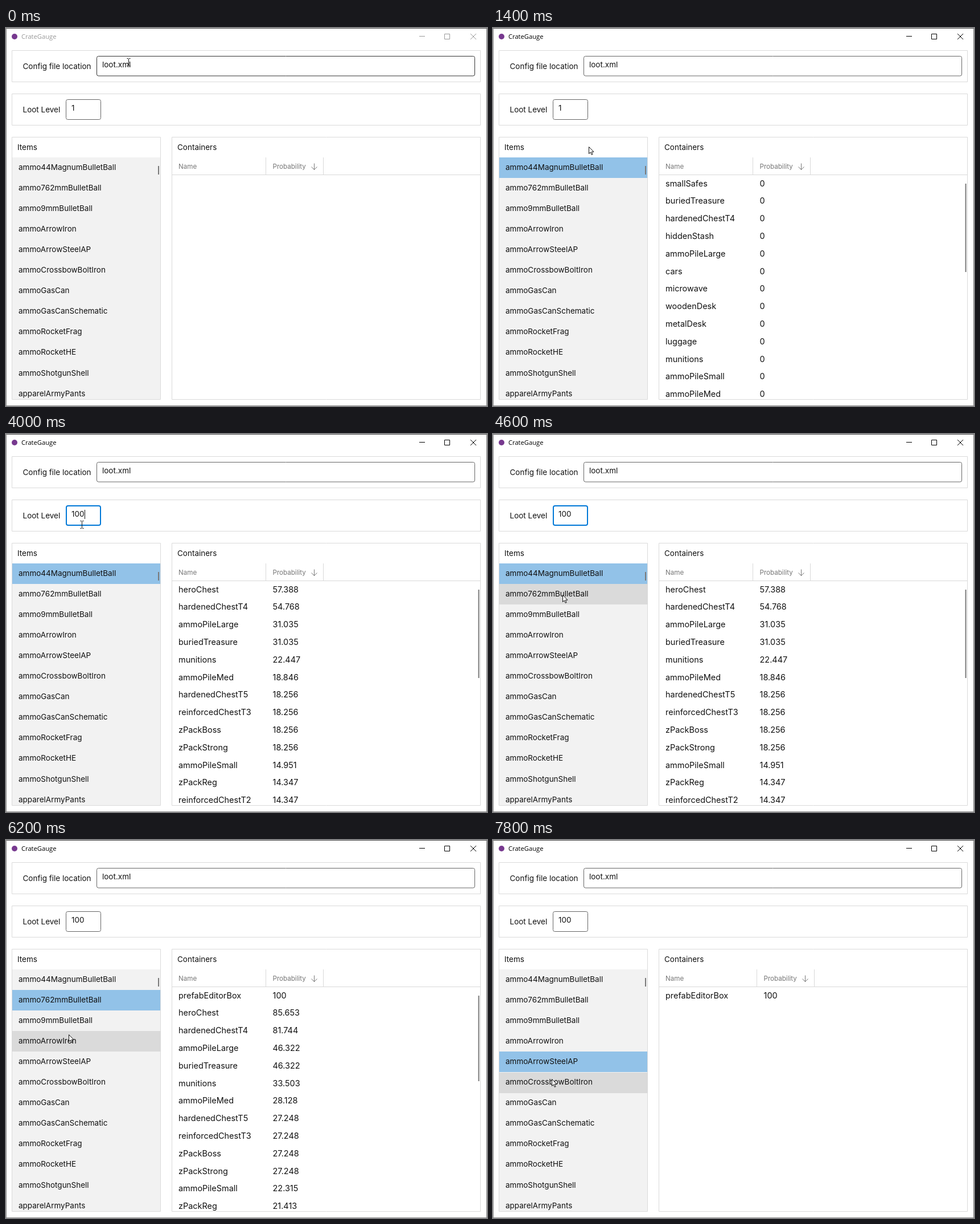
These frames come from a looping animation (845 by 663 pixels, 8 s). An HTML page with a canvas:

```html
<!DOCTYPE html>
<html lang="en">
<head>
<meta charset="utf-8">
<title>CrateGauge</title>
<style>
  html, body { margin: 0; width: 100%; height: 100%; overflow: hidden; background: #fff; }
  canvas { display: block; }
</style>
</head>
<body>
<canvas id="stage" width="845" height="663"></canvas>
<script>
const ctx = document.getElementById('stage').getContext('2d');
const LOOP = 8000;
const FOCUS = 2870, BLUR = 5200;
const UI_FONT = 'Inter, sans-serif';
const ROW = { top: 227, height: 36.1 };

const items = ('ammo44MagnumBulletBall ammo762mmBulletBall ammo9mmBulletBall ammoArrowIron ' +
  'ammoArrowSteelAP ammoCrossbowBoltIron ammoGasCan ammoGasCanSchematic ammoRocketFrag ' +
  'ammoRocketHE ammoShotgunShell apparelArmyPants').split(' ');

// Contents of the container grid, each with its start time and scrollbar end.
const grids = [
  { at: 0, rows: '' },
  { at: 1070, bar: 428, rows: 'smallSafes 0,buriedTreasure 0,hardenedChestT4 0,hiddenStash 0,ammoPileLarge 0,' +
    'cars 0,microwave 0,woodenDesk 0,metalDesk 0,luggage 0,munitions 0,ammoPileSmall 0,ammoPileMed 0' },
  { at: 3930, bar: 428, rows: 'heroChest 57.388,hardenedChestT4 54.768,ammoPileLarge 31.035,' +
    'buriedTreasure 31.035,munitions 22.447,ammoPileMed 18.846,hardenedChestT5 18.256,' +
    'reinforcedChestT3 18.256,zPackBoss 18.256,zPackStrong 18.256,ammoPileSmall 14.951,' +
    'zPackReg 14.347,reinforcedChestT2 14.347' },
  { at: 5200, bar: 423, rows: 'prefabEditorBox 100,heroChest 85.653,hardenedChestT4 81.744,' +
    'ammoPileLarge 46.322,buriedTreasure 46.322,munitions 33.503,ammoPileMed 28.128,' +
    'hardenedChestT5 27.248,reinforcedChestT3 27.248,zPackBoss 27.248,zPackStrong 27.248,' +
    'ammoPileSmall 22.315,zPackReg 21.413' },
  { at: 6670, bar: 495, wide: true, rows: 'heroChest 42.827,ammoPileMed 14.064,ammoPileSmall 11.157,' +
    'zPackReg 10.707,reinforcedChestT2 10.707,reinforcedChestT1 10.707,shotgunMessiahCrate 6.721,' +
    'ammoDisplay 5.804,gunSafe 4.818,smallSafes 4.684,weaponsBagLarge 4.015,armyTruck 3.373,munitions 3.127' },
  { at: 7330, wide: true, rows: 'prefabEditorBox 100' }
];

const clicks = [
  { at: 1070, row: 0 }, { at: 5200, row: 1 }, { at: 6670, row: 3 }, { at: 7330, row: 4 }
];
const levels = [{ at: 0, text: '1' }, { at: 3330, text: '10' }, { at: 3930, text: '100' }];

// Pointer path: time, x, y
const path = [
  [0, 216, 59], [600, 169, 243], [1070, 169, 243], [1400, 168, 208], [1870, 144, 150],
  [2070, 135, 143], [3930, 135, 143], [4600, 122, 282], [4730, 121, 285], [4800, 121, 286],
  [5200, 121, 286], [5670, 113, 319], [5800, 113, 319], [6400, 108, 352], [6600, 108, 352],
  [6930, 107, 366], [7270, 104, 394], [7470, 104, 394], [7800, 103, 419], [8000, 103, 419]
];

const latest = (list, t) => list.filter(entry => entry.at <= t).pop();

function pointerAt(t) {
  const i = Math.max(1, path.findIndex(p => p[0] >= t));
  const [t0, x0, y0] = path[i - 1], [t1, x1, y1] = path[i];
  const k = (t - t0) / (t1 - t0);
  return { x: Math.round(x0 + (x1 - x0) * k), y: Math.round(y0 + (y1 - y0) * k) };
}

function text(str, x, y, size, color = '#111', family = UI_FONT) {
  ctx.font = `${size}px ${family}`;
  ctx.fillStyle = color;
  ctx.fillText(str, x, y);
}

function fill(x, y, w, h, color) {
  ctx.fillStyle = color;
  ctx.fillRect(x, y, w, h);
}

function frame(x, y, w, h, color, radius = 0, width = 1) {
  ctx.beginPath();
  ctx.roundRect(x, y, w, h, radius);
  ctx.strokeStyle = color;
  ctx.lineWidth = width;
  ctx.stroke();
}

function strokePath(d, x, y, color, width = 1) {
  ctx.save();
  ctx.translate(x, y);
  ctx.strokeStyle = color;
  ctx.lineWidth = width;
  ctx.stroke(new Path2D(d));
  ctx.restore();
}

function clipped(x, y, w, h, draw) {
  ctx.save();
  ctx.beginPath();
  ctx.rect(x, y, w, h);
  ctx.clip();
  draw();
  ctx.restore();
}

function drawTitleBar(active) {
  const color = active ? '#000' : '#999';
  ctx.fillStyle = '#77398f';
  ctx.beginPath();
  ctx.arc(15, 15, 5, 0, Math.PI * 2);
  ctx.fill();
  text('CrateGauge', 27, 19, 11.2, color, '"Open Sans", sans-serif');
  strokePath('M0 0H10', 726, 14.5, color);
  frame(770.5, 10.5, 9, 9, color);
  strokePath('M0 0L10 10M10 0L0 10', 816, 10, color);
}

function drawField(x, y, w, h, value, hover, focus) {
  if (focus) frame(x + .5, y + .5, w - 1, h - 1, '#0078d7', 3, 2);
  else frame(x, y, w, h, hover ? '#333' : '#666', 3);
  text(value, x + 9.5, y + 19.5, 13.5);
}

function rowColor(row, hoverRow, t) {
  const click = latest(clicks, t);
  const hovered = row === hoverRow;
  if (click && click.row === row) {
    const alpha = !hovered ? .4 : t - click.at < 130 ? .7 : .6;
    return `rgba(0,120,215,${alpha})`;
  }
  return hovered ? '#dadada' : null;
}

function drawItems(hoverRow, t) {
  text('Items', 20, 214, 13.5);
  clipped(11, 227, 260, 424, () => {
    fill(11, 227, 260, 424, '#f2f2f2');
    items.forEach((name, i) => {
      const y = Math.round(ROW.top + i * ROW.height);
      const color = rowColor(i, hoverRow, t);
      if (color) fill(11, y, 260, 36, color);
      text(name, 22, 248.5 + i * ROW.height, 13.5);
    });
    fill(267, 242, 2, 15, '#7a7a7a');
  });
}

function drawGrid({ rows, bar, wide }) {
  const shift = wide ? 7 : 0;
  text('Containers', 301, 214, 13.5);
  text('Name', 303, 247, 11.6, '#767676');
  text('Probability', 468.5 + shift, 247, 11.6, '#767676');
  strokePath('M0 0V11M-5 6L0 11L5 6', 541.5 + shift, 237.5, '#767676');
  fill(456 + shift, 227, 1, 30, '#d9d9d9');
  fill(557 + shift, 227, 1, 30, '#d9d9d9');
  fill(292, 257, 541, 1, '#d9d9d9');
  clipped(292, 258, 541, 393, () => {
    if (rows) rows.split(',').forEach((row, i) => {
      const [name, chance] = row.split(' ');
      const y = 277.5 + i * 30.8;
      text(name, 303, y, 14.46);
      text(chance, 468.5 + shift, y, 14.46);
    });
    if (bar) fill(829.5, 273, 2, bar - 273, '#7a7a7a');
  });
}

function drawPointer({ x, y }, overField) {
  if (overField) {
    strokePath('M-3 -6H-1L0 -5L1 -6H3M0 -5V6M-3 7H-1L0 6L1 7H3', x - .5, y + .5, '#111');
    return;
  }
  const arrow = 'M.5 .5V12.5L3.3 9.9L5.2 14.3L7.1 13.5L5.2 9.2H9Z';
  ctx.save();
  ctx.translate(x, y);
  ctx.fillStyle = '#fff';
  ctx.fill(new Path2D(arrow));
  ctx.restore();
  strokePath(arrow, x, y, '#111');
}

function draw(t) {
  const pointer = pointerAt(t);
  const inside = (x, y, w, h) =>
    pointer.x >= x && pointer.x < x + w && pointer.y >= y && pointer.y < y + h;
  const overPath = inside(159, 49, 665, 35), overLevel = inside(105, 125, 62, 36);
  const hoverRow = inside(11, 227, 260, 424) ? Math.floor((pointer.y - ROW.top) / ROW.height) : -1;
  const focused = t >= FOCUS && t < BLUR;
  const level = latest(levels, t).text;

  fill(0, 0, 845, 663, '#fff');
  [[10.5, 39.5, 823, 55], [10.5, 115.5, 823, 55], [10.5, 191.5, 261, 460], [291.5, 191.5, 542, 460]]
    .forEach(panel => frame(...panel, '#dadada'));

  drawTitleBar(t >= clicks[0].at);
  text('Config file location', 29.5, 71.5, 13.5);
  drawField(159.5, 49.5, 664, 34.5, 'loot.xml', overPath, false);
  text('Loot Level', 29.5, 147.5, 13.5);
  drawField(105.5, 125.5, 61, 35, level, overLevel, focused);
  if (focused && Math.floor((t - FOCUS) / 530) % 2 === 0) {
    fill(Math.round(115 + ctx.measureText(level).width), 133, 1, 16, '#111');
  }
  drawItems(hoverRow, t);
  drawGrid(latest(grids, t));

  fill(0, 0, 845, 1, '#4a4a4a');
  fill(0, 0, 1, 663, '#8a8a8a');
  fill(844, 0, 1, 663, '#777');
  fill(0, 662, 845, 1, '#8a8a8a');
  drawPointer(pointer, overPath || overLevel);
}

const start = performance.now();
function tick() {
  const elapsed = (performance.now() - start) % LOOP;
  draw(Math.round(Math.floor(elapsed * 3 / 200) * 20 / 3) * 10);
  requestAnimationFrame(tick);
}
tick();
</script>
</body>
</html>
```
